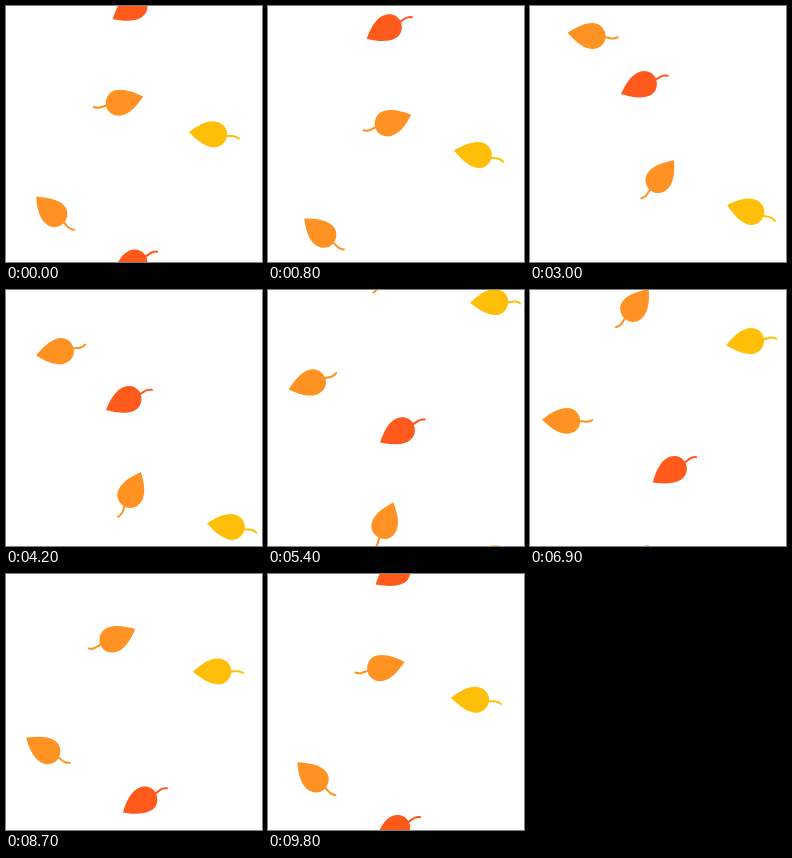
Recreate the animation shown at these times as an HTML page with a canvas. Size 256 by 256 pixels, loop 9900 ms.

```html
<!DOCTYPE html>
<html lang="en">
<head>
<meta charset="utf-8">
<title>Falling leaves</title>
<style>
  html, body { margin: 0; width: 100%; height: 100%; overflow: hidden; background: #fff; }
  canvas { display: block; }
</style>
</head>
<body>
<canvas id="stage" width="256" height="256"></canvas>
<script>
const SIZE = 256, LOOP = 9900, STEP = 100;
const ctx = document.getElementById('stage').getContext('2d');

// One leaf lying on the x axis, tip to the left, centred on its full length
const blade = new Path2D('M-25.5 .2C-17.5-7.5-9-13.5-1-13.5C7-13.5 12.7-8 12.7-1C12.7 6.5 7 12.4 0 12.4C-9 12.4-17.5 6.5-25.5 .2Z');
const stem = new Path2D('M12-.5C16-.5 17.5-1.4 20-1.1C22.5-.9 23.5-.1 24.8 .8');

// Sway keys: drift in x and tilt in degrees at each time; the fall is steady
const times = [0, 1600, 3000, 5400, 6900, 8700];
const leaves = [
  { color: '#ff5a1c', y: 0.8, flip: 1,
    x: [129, 115.5, 114.5, 134.5, 144.5, 139],
    tilt: [-28.5, -24, -22, -28, -31, -29.6] },
  { color: '#ff9222', y: 96.3, flip: 1,
    x: [112.3, 125.3, 127.8, 115.7, 102.5, 105.9],
    tilt: [167.4, 150, 130, 112.4, 130, 156.5] },
  { color: '#ffbf08', y: 129, flip: 1,
    x: [208.3, 215.5, 221.5, 227.5, 221.5, 212.5],
    tilt: [6.8, 16.6, 17.7, 0, -8, 1] },
  { color: '#ff9222', y: 207.9, flip: -1,
    x: [49, 62, 63, 45, 37.5, 42],
    tilt: [41.8, 29.6, 5.7, -18.4, 1.2, 30.6] }
];

const count = times.length;
const wrap = i => (i + count) % count;
const timeAt = i => times[wrap(i)] + Math.floor(i / count) * LOOP;

function slope(values, i) {
  const before = timeAt(i) - timeAt(i - 1), after = timeAt(i + 1) - timeAt(i);
  const here = values[wrap(i)];
  const left = (here - values[wrap(i - 1)]) / before;
  const right = (values[wrap(i + 1)] - here) / after;
  return (left * after + right * before) / (before + after);
}

// Smooth periodic curve through the keys
function sway(values, t) {
  let i = count - 1;
  while (times[i] > t) i--;
  const span = timeAt(i + 1) - timeAt(i), s = (t - timeAt(i)) / span;
  const ease = s * s * (3 - 2 * s);
  return values[i] * (1 - ease) + values[wrap(i + 1)] * ease
    + span * s * (1 - s) * (slope(values, i) * (1 - s) - slope(values, i + 1) * s);
}

function drawLeaf(leaf, t) {
  const x = sway(leaf.x, t), angle = sway(leaf.tilt, t) * Math.PI / 180;
  const y = (leaf.y + SIZE * t / LOOP) % SIZE;
  ctx.fillStyle = ctx.strokeStyle = leaf.color;
  for (const offset of [-SIZE, 0, SIZE]) {
    ctx.save();
    ctx.translate(x, y + offset);
    ctx.rotate(angle);
    ctx.scale(1, leaf.flip);
    ctx.fill(blade);
    ctx.stroke(stem);
    ctx.restore();
  }
}

function draw(now) {
  const t = Math.floor(now % LOOP / STEP) * STEP;
  ctx.fillStyle = '#fff';
  ctx.fillRect(0, 0, SIZE, SIZE);
  ctx.lineWidth = 2;
  ctx.lineCap = 'round';
  for (const leaf of leaves) drawLeaf(leaf, t);
}

const start = performance.now();
function tick() {
  draw(performance.now() - start);
  requestAnimationFrame(tick);
}
tick();
</script>
</body>
</html>
```
